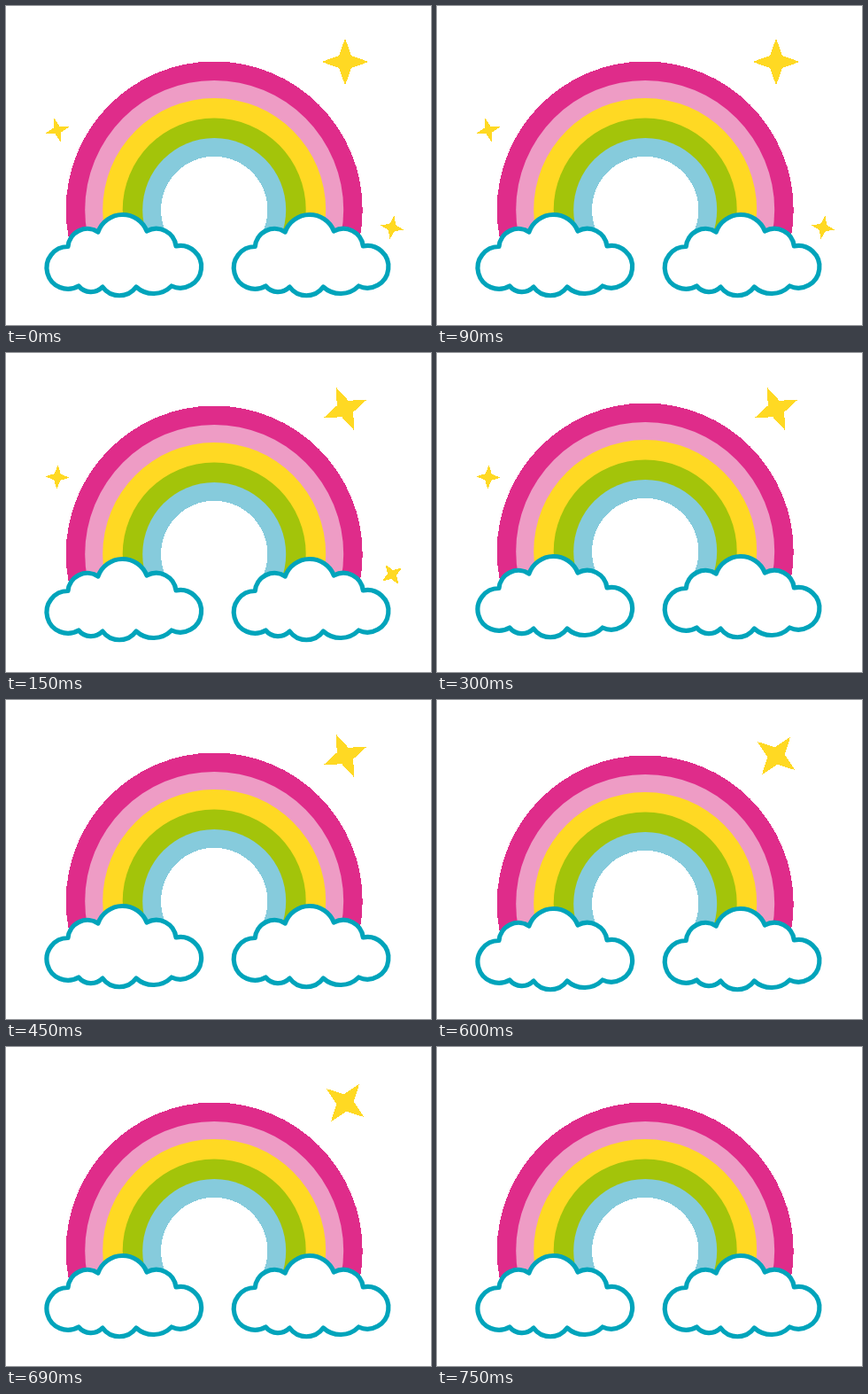
Animation of 480x360 px, one loop 0.9 s. Source, as an HTML page:

```html
<!DOCTYPE html>
<html lang="en">
<head>
<meta charset="utf-8">
<title>Bobbing rainbow</title>
<style>
  html, body { margin: 0; height: 100%; overflow: hidden; background: #fff; }
  svg { display: block; width: 100%; height: 100%; }
  #stars, #bands circle:first-child, #bands circle:last-child { shape-rendering: crispEdges; }
</style>
</head>
<body>
<svg viewBox="0 0 480 360">
  <defs>
    <clipPath id="horizon"><path d="M0 0H480V262H0Z"/></clipPath>
    <path id="cloud" fill="#fff" stroke="#00a4bb" stroke-width="5.2" stroke-linejoin="round"
      d="M70 271.5A22 22 0 0 1 104 255A29.4 29.4 0 0 1 159 254A22.5 22.5 0 0 1 192 271
         A23.8 23.8 0 1 1 187 316A29 29 0 0 1 147 317A23.4 23.4 0 0 1 109 317
         A18 18 0 0 1 82 316A23.9 23.9 0 1 1 70 271.5Z"/>
    <path id="star" fill="#ffd923"
      d="M0-26.6L7-7L26.6 0L7 7L0 26.6L-7 7L-26.6 0L-7-7Z"/>
  </defs>
  <g id="scene">
    <g id="bands" clip-path="url(#horizon)"></g>
    <use href="#cloud"/>
    <use href="#cloud" x="211.3"/>
  </g>
  <g id="stars"></g>
</svg>
<script>
const STEP = 150;
const lift = [0, 3, 6, 3, 0, 0];

// One angle per step; the star is hidden once its list runs out.
const stars = [
  { x: 383, y: 63, scale: 1, angles: [0, -23, -23, -23, 37] },
  { x: 58, y: 140, scale: 0.51, angles: [-15, 3, 3] },
  { x: 436, y: 250, scale: 0.51, angles: [11, 56] }
];

const bands = [
  [167.5, '#df2c8a'], [146, '#ee9cc5'], [126, '#ffd923'],
  [103.5, '#a3c40a'], [81, '#86cbdc'], [60.2, '#fff']
];

const scene = document.getElementById('scene');

function add(parentId, tag, attributes) {
  const node = document.createElementNS('http://www.w3.org/2000/svg', tag);
  for (const name in attributes) node.setAttribute(name, attributes[name]);
  return document.getElementById(parentId).appendChild(node);
}

for (const [r, fill] of bands) add('bands', 'circle', { cx: 235.2, cy: 230, r, fill });
for (const star of stars) star.node = add('stars', 'use', { href: '#star' });

function draw(now) {
  const step = Math.floor(now / STEP) % lift.length;
  scene.setAttribute('transform', `translate(0 ${-lift[step]})`);
  for (const { x, y, scale, angles, node } of stars) {
    const visible = step < angles.length;
    node.setAttribute('visibility', visible ? 'visible' : 'hidden');
    if (visible) {
      node.setAttribute('transform', `translate(${x} ${y}) rotate(${angles[step]}) scale(${scale})`);
    }
  }
}

function tick() {
  draw(performance.now() - start);
  requestAnimationFrame(tick);
}

const start = performance.now();
tick();
</script>
</body>
</html>
```
